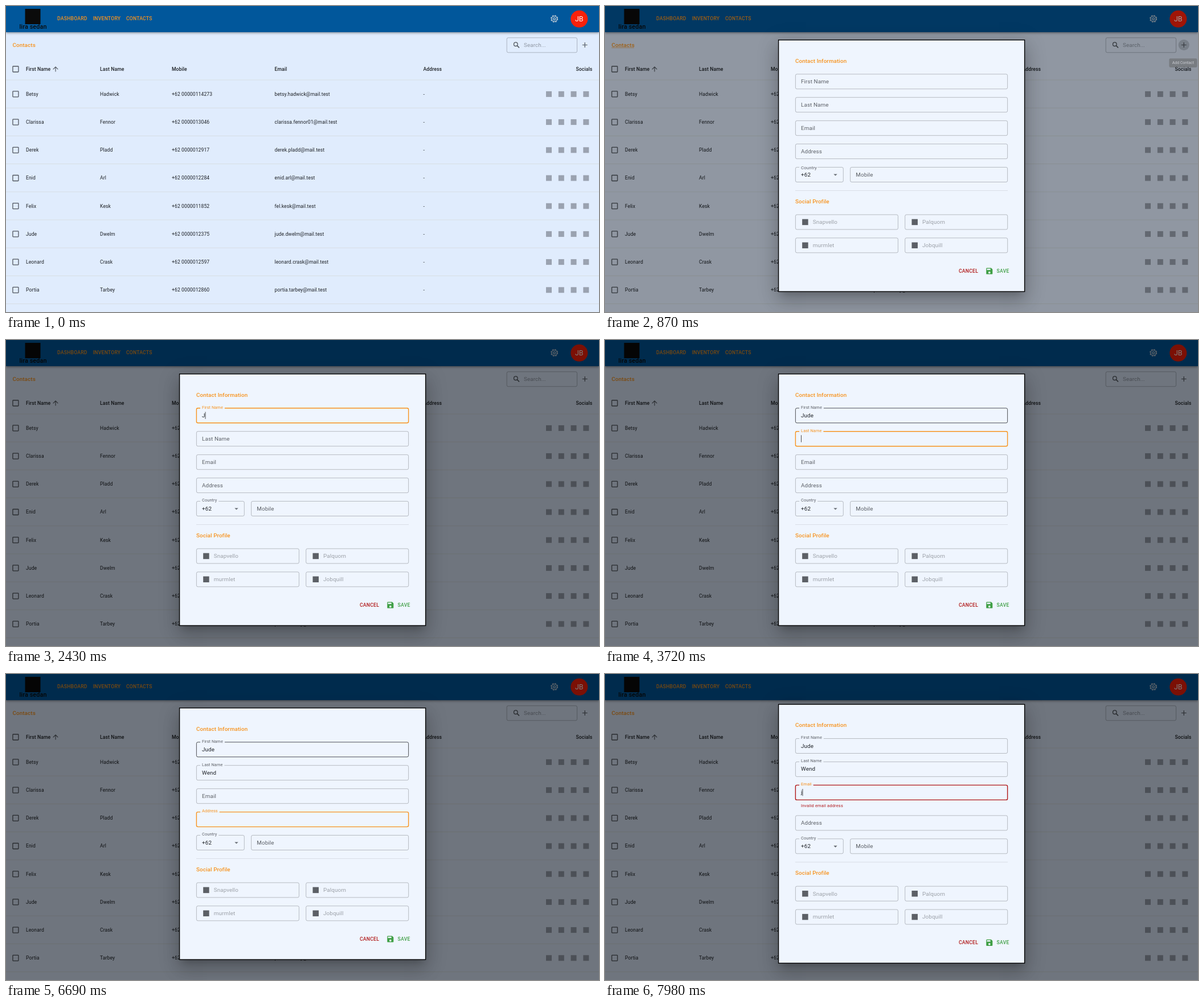
Write an HTML page that moves like this. It is 1041 by 538 pixels and loops after 8 s.

```html
<!DOCTYPE html>
<html lang="en">
<head>
<meta charset="utf-8">
<title>Contacts</title>
<style>
  html, body { margin: 0; width: 100%; height: 100%; overflow: hidden; background: #e0ecfd; }
  body > *, #dialog > * { position: absolute; left: 0; top: 0; }
  svg { width: 1041px; height: 538px; display: block; }
  text { font-family: Roboto, sans-serif; font-size: 9.84px; letter-spacing: .00938em; white-space: pre; }
  .small { font-size: 8.61px; letter-spacing: .01071em; }
  .button { font-size: 8.61px; letter-spacing: .02857em; }
  .tiny { font-size: 7.38px; letter-spacing: .03em; }
  .strong { font-weight: 500; }
  #bar { width: 1041px; height: 45.6px; background: #01579b;
    box-shadow: 0 1.2px 2.5px -.6px #0003, 0 2.5px 3px #00000024, 0 .6px 6px #0000001f; }
  #shade { width: 1041px; height: 538px; background: #000; }
  #dialog { width: 1041px; height: 538px; }
  #paper { left: 304.5px; width: 432px; background: #eff5fe;
    box-shadow: 0 8.2px 11.2px -5.2px #0003, 0 18px 28.5px 2.2px #00000024, 0 6.8px 34.5px 6px #0000001f; }
</style>
</head>
<body>
<div id="bar"></div>
<svg id="page"></svg>
<div id="shade"></div>
<div id="dialog"><div id="paper"></div><svg id="form"></svg></div>
<svg id="top"></svg>
<script>
const LOOP = 8000, BLINK = 450;
const ORANGE = '#f7931e', INK = '#1d2126', ICON = '#50565e', PAPER = '#eff5fe', RED = '#b01717', GREEN = '#3f9f45';
const $ = id => document.getElementById(id);
const set = (node, attrs) => { for (const k in attrs) node.setAttribute(k, attrs[k]); return node; };

function add(parent, tag, attrs) {
  return parent.appendChild(set(document.createElementNS('http://www.w3.org/2000/svg', tag), attrs));
}
function text(parent, x, y, str, fill = INK, cls = '', anchor = 'start') {
  const node = add(parent, 'text', { x, y, fill, class: cls, 'text-anchor': anchor });
  node.textContent = str;
  return node;
}
const box = (parent, x, y, width, height, attrs) => add(parent, 'rect', { x, y, width, height, ...attrs });
const square = (parent, cx, cy, size, fill) => box(parent, cx - size / 2, cy - size / 2, size, size, { fill });
const line = (parent, d, stroke, width) => add(parent, 'path', { d, stroke, 'stroke-width': width, fill: 'none' });
const outline = (parent, x, y, w, h) =>
  box(parent, x, y, w, h, { rx: 2.5, fill: 'none', stroke: '#000', 'stroke-opacity': .3, 'stroke-width': .8 });

const clamp = v => Math.max(0, Math.min(1, v));
const smooth = (t, a, b) => { const p = clamp((t - a) / (b - a)); return p * p * (3 - 2 * p); };
const within = (spans, t) => spans.some(([a, b]) => t >= a && t < b);

// cubic-bezier(0, 0, .2, 1)
function easeOut(p) {
  p = clamp(p);
  let lo = 0, hi = 1;
  for (let i = 0; i < 16; i++) {
    const s = (lo + hi) / 2;
    if (.6 * s * s * (1 - s) + s ** 3 < p) lo = s; else hi = s;
  }
  return lo * lo * (3 - 2 * lo);
}
// Rises at the start of each span and falls again after its end.
function level(spans, t) {
  let v = 0;
  for (const [a, b] of spans) {
    if (t < a) break;
    v = easeOut((Math.min(t, b) - a) / 200);
    if (t >= b) v *= 1 - easeOut((t - b) / 200);
  }
  return v;
}
function labelColor(k) {
  const to = [247, 147, 30];
  return `rgb(${[92, 96, 102].map((c, i) => Math.round(c + (to[i] - c) * k))})`;
}

function drawHeader(svg) {
  square(svg, 47, 18.5, 27, '#0b0b0b');
  text(svg, 47.5, 39.8, 'lira sedan', '#0b0b0b', 'strong', 'middle').style.fontSize = '10.8px';
  [[90, 'DASHBOARD'], [152.7, 'INVENTORY'], [211, 'CONTACTS']]
    .forEach(([x, name]) => text(svg, x, 25.4, name, ORANGE, 'button strong'));
  const gear = { cx: 962.6, cy: 22.5, fill: 'none', stroke: '#b5c4d2' };
  add(svg, 'circle', { ...gear, r: 4.7, 'stroke-width': 1.3 });
  add(svg, 'circle', { ...gear, r: 5.8, 'stroke-width': 1.5, 'stroke-dasharray': '2.6 1.955' });
  add(svg, 'circle', { ...gear, r: 1.9, 'stroke-width': 1.3 });
  add(svg, 'circle', { cx: 1006.3, cy: 22.8, r: 15, fill: '#f8210b' });
  text(svg, 1006.3, 27, 'JB', '#fff', '', 'middle').style.fontSize = '12.3px';
}

function drawTable(svg) {
  text(svg, 11.5, 71.8, 'Contacts', ORANGE, 'strong');
  outline(svg, 879.2, 55.8, 123.3, 26);
  add(svg, 'circle', { cx: 894.8, cy: 67.2, r: 3.3, fill: 'none', stroke: ICON, 'stroke-width': 1.3 });
  line(svg, 'M897.2 69.6l3.8 3.8', ICON, 1.5);
  text(svg, 909, 72, 'Search...', '#8f97a3');

  const columns = [35, 165, 291, 471.5, 732.5];
  const check = y => box(svg, 11.9, y - 5, 10, 10, { rx: .8, fill: 'none', stroke: ICON, 'stroke-width': 1.3 });
  const rule = y => line(svg, `M0 ${y}H1041`, '#d6dde1', .9);
  check(111);
  ['First Name', 'Last Name', 'Mobile', 'Email', 'Address']
    .forEach((name, i) => text(svg, columns[i], 113.8, name, INK, 'small strong'));
  text(svg, 1029.3, 113.8, 'Socials', INK, 'small strong', 'end');
  line(svg, 'M87 115.5V107.2M82.7 111.3L87 107L91.3 111.3', ICON, 1.1);
  rule(130);

  const people = [
    ['Betsy', 'Hadwick', '00000114273'], ['Clarissa', 'Fennor', '0000013046', 'clarissa.fennor01'],
    ['Derek', 'Pladd', '0000012917'], ['Enid', 'Arl', '0000012284'],
    ['Felix', 'Kesk', '0000011852', 'fel.kesk'], ['Jude', 'Dwelm', '0000012375'],
    ['Leonard', 'Crask', '0000012597'], ['Portia', 'Tarbey', '0000012860']
  ];
  people.forEach(([first, last, phone, mail = `${first}.${last}`.toLowerCase()], row) => {
    const y = 154.9 + row * 49.2;
    check(y);
    [first, last, '+62 ' + phone, mail + '@mail.test', '-']
      .forEach((cell, i) => text(svg, columns[i], y + 2.9, cell, INK, 'small'));
    [953, 974.8, 996.5, 1018.3].forEach(x => square(svg, x, y, 10, '#9aa2b0'));
    rule(y + 24.3);
  });
}

function makeField({ parent, name, x = 334.4, y, w = 372.2, focus = [], up = focus, hover = [], typed = [] }) {
  const border = outline(parent, x, y, w, 26);
  const gap = line(parent, '', PAPER, 2.4);
  const label = text(parent, 0, 0, name);
  const value = text(parent, x + 9.7, y + 16.1, '');
  const caret = line(parent, '', '#222', .8);

  return t => {
    const lift = level(up, t), active = within(focus, t);
    const scale = 1 - lift * .25, left = x + 9.7;
    set(label, {
      transform: `translate(${left} ${y + 16.4 - lift * 15.6}) scale(${scale})`,
      fill: labelColor(level(focus, t))
    });
    const open = clamp((lift - .4) / .4) * (label.getComputedTextLength() * .75 + 6);
    set(gap, { d: open ? `M${left - 3} ${y}h${open}` : '' });

    const keys = typed.filter(([at]) => t >= at);
    value.textContent = keys.map(k => k[1]).join('');
    const wrong = name === 'Email' && keys.length > 0;
    set(border, {
      stroke: wrong ? RED : active ? ORANGE : '#000',
      'stroke-opacity': active ? 1 : within(hover, t) ? .85 : .3,
      'stroke-width': active ? 1.4 : .8
    });

    const begin = active ? focus.find(([a, b]) => t >= a && t < b)[0] : 0;
    const since = t - Math.max(begin, ...keys.map(k => k[0]));
    const shown = active && since % (2 * BLINK) < BLINK;
    const cx = left + .4 + (keys.length ? value.getComputedTextLength() : 0);
    set(caret, { d: shown ? `M${cx} ${y + 6.6}v12.4` : '' });
  };
}

function drawForm(upper, lower) {
  text(upper, 334, 99.8, 'Contact Information', ORANGE, 'strong');
  const END = Infinity;
  const fields = [
    { parent: upper, name: 'First Name', y: 119.8, focus: [[1650, 3525]], up: [[1650, END]], hover: [[1470, 6705]],
      typed: [[2395, 'J'], [3000, 'u'], [3270, 'd'], [3510, 'e']] },
    { parent: upper, name: 'Last Name', y: 160.7, focus: [[3525, 5175]], up: [[3525, END]],
      hover: [[1290, 1320], [6870, 6930]], typed: [[3900, 'W'], [3970, 'e'], [4460, 'n'], [4740, 'd']] },
    { parent: upper, name: 'Email', y: 201.7, focus: [[5175, 5335], [7280, END]], hover: [[6930, 7280]],
      typed: [[7980, 'j']] },
    { parent: lower, name: 'Address', y: 242.6, focus: [[5335, 7280]] },
    { parent: lower, name: 'Country', y: 283.5, w: 83.9, up: [[780, END]], focus: [], typed: [[0, '+62']] },
    { parent: lower, name: 'Mobile', x: 430.6, y: 283.5, w: 276 }
  ].map(makeField);

  add(lower, 'path', { d: 'M401.3 295.4h6.4l-3.2 3.2z', fill: '#666b72' });
  line(lower, 'M334 324.5H707', '#d3d9e1', .8);
  text(lower, 334, 347, 'Social Profile', ORANGE, 'strong');
  ['Snapvello', 'Palquorn', 'murmlet', 'Jobquill'].forEach((name, i) => {
    const x = 334.4 + (i % 2) * 192.3, y = 366.9 + (i >> 1) * 40.9;
    outline(lower, x, y, 180, 26);
    square(lower, x + 17, y + 13, 10.5, '#5c6066');
    text(lower, x + 30.4, y + 16.4, name, '#9ca1a8');
  });
  text(lower, 621, 469, 'CANCEL', RED, 'button strong');
  text(lower, 687.6, 469, 'SAVE', GREEN, 'button strong');
  add(lower, 'path', {
    d: 'M17 3H5a2 2 0 0 0-2 2v14a2 2 0 0 0 2 2h14a2 2 0 0 0 2-2V7zM12 19a3 3 0 1 1 0-6a3 3 0 1 1 0 6zM15 9H5V5h10z',
    fill: GREEN, 'fill-rule': 'evenodd', transform: 'translate(667.4 458.7) scale(.615)'
  });
  return fields;
}

drawHeader($('page'));
drawTable($('page'));
const underline = line($('page'), 'M11.5 73.4H51', ORANGE, .6);
const halo = add($('page'), 'circle', { cx: 1016.2, cy: 68.5, r: 9.6, fill: '#000' });
line($('page'), 'M1016.2 64.1v8.8M1011.8 68.5h8.8', ICON, 1.2);

const frame = box($('form'), 304.6, 0, 432, 0, { fill: 'none', stroke: '#000', 'stroke-width': 1.4 });
const upper = add($('form'), 'g', {}), lower = add($('form'), 'g', {});
const fields = drawForm(upper, lower);
const helper = text(upper, 344, 239.9, 'Invalid email address', RED, 'tiny');

const tip = add($('top'), 'g', {});
box(tip, 990.3, 92.3, 49.2, 15.6, { rx: 2.4, fill: '#616161', 'fill-opacity': .92 });
text(tip, 1014.9, 102.4, 'Add Contact', '#fff', '', 'middle').style.fontSize = '6.77px';

function render(t) {
  set(halo, { opacity: smooth(t, 210, 360) * (1 - smooth(t, 920, 1050)) * .16 });
  underline.style.display = t >= 750 && t < 1050 ? '' : 'none';

  const grow = smooth(t, 390, 600), s = .75 + .25 * grow;
  set(tip, {
    opacity: grow * (1 - smooth(t, 780, 970)),
    transform: `translate(1014.9 92.3) scale(${s} ${s * s}) translate(-1014.9 -92.3)`
  });

  $('shade').style.opacity = .5 * smooth(t, 750, 935);
  $('dialog').style.opacity = smooth(t, 750, 860);

  const shift = t >= 7980 ? 6.3 : 0;
  const top = 59.7 - shift, height = 442.4 + 2 * shift;
  $('paper').style.top = top + 'px';
  $('paper').style.height = height + 'px';
  set(frame, { y: top, height });
  set(upper, { transform: `translate(0 ${-shift})` });
  set(lower, { transform: `translate(0 ${shift})` });
  helper.style.display = shift ? '' : 'none';
  fields.forEach(draw => draw(t));
}

const start = performance.now();
function tick() {
  render((performance.now() - start) % LOOP);
  requestAnimationFrame(tick);
}
tick();
</script>
</body>
</html>
```
